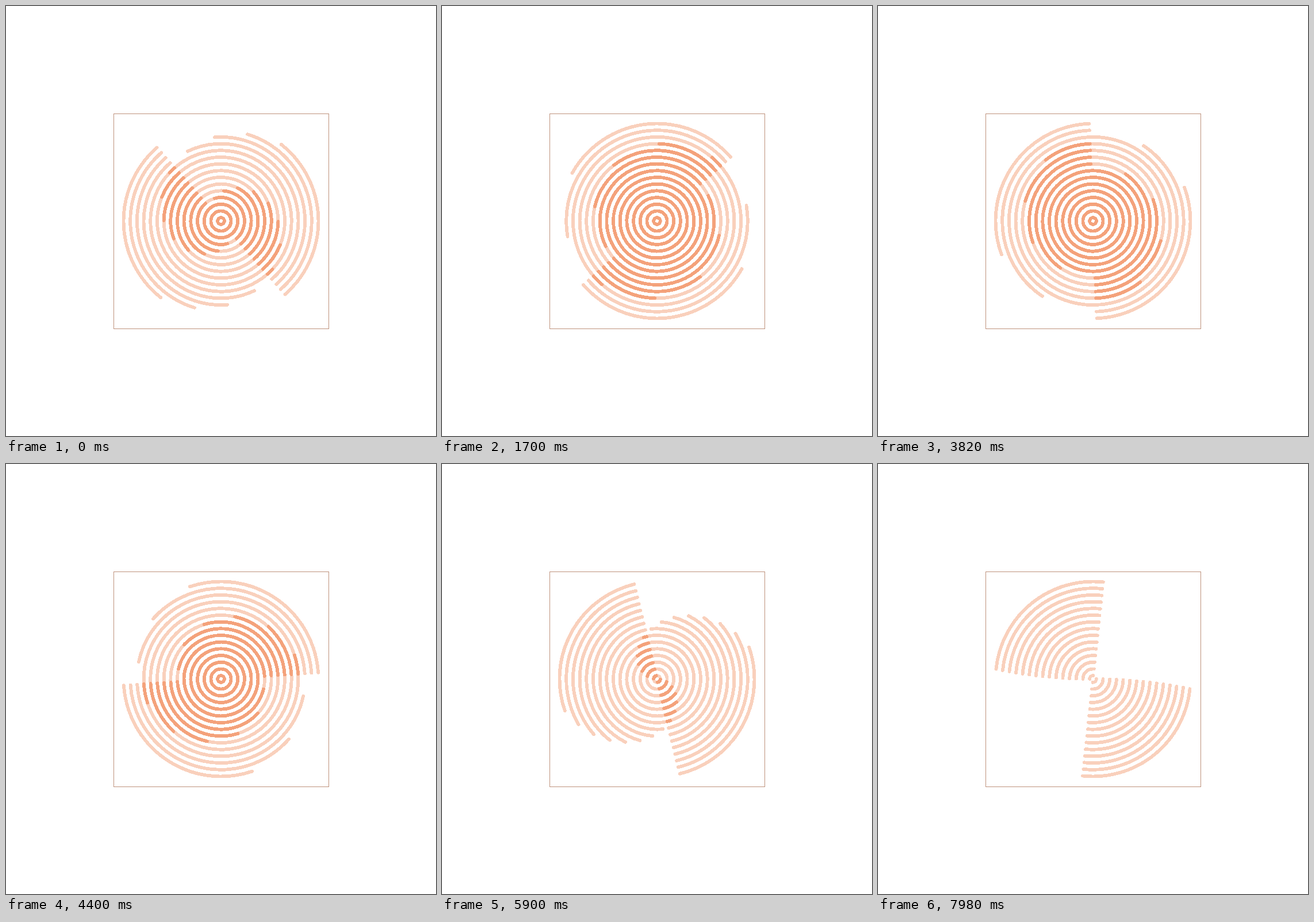
An HTML page for the animation above (8 s loop, 748 by 748 pixels).

```html
<!DOCTYPE html>
<html lang="en">
<head>
<meta charset="utf-8">
<title>Winding rings</title>
<style>
  html, body { margin: 0; width: 100%; height: 100%; overflow: hidden; background: #fff; }
  svg { display: block; width: 100vw; height: 100vh; }
  circle { fill: none; stroke-linecap: round; }
</style>
</head>
<body>
<svg viewBox="0 0 748 748" shape-rendering="crispEdges">
  <rect x="187.5" y="187.5" width="374" height="374" fill="none" stroke="#bf917c"/>
  <g id="rings" transform="translate(374 374)"></g>
</svg>
<script>
const LOOP = 8000, STEP = 20, CYCLE = 10240;
const RINGS = 15, GAP = 374 / 32;
const LIGHT = '#f9d0bc', DARK = '#f4a27b';
const group = document.getElementById('rings');

function addArc(r, color) {
  const c = document.createElementNS('http://www.w3.org/2000/svg', 'circle');
  c.setAttribute('r', r);
  c.setAttribute('pathLength', 360);
  c.setAttribute('stroke', color);
  c.setAttribute('stroke-width', GAP / 2);
  group.appendChild(c);
  return c;
}

function setArc(c, start, length) {
  c.setAttribute('visibility', length > 0 ? 'visible' : 'hidden');
  c.setAttribute('stroke-dasharray', `${Math.max(length, 0)} 720`);
  c.setAttribute('transform', `rotate(${start % 360})`);
}

const rings = Array.from({ length: RINGS }, (_, i) => {
  const pos = i + 0.5, r = pos * GAP;
  const pair = color => [addArc(r, color), addArc(r, color)];
  return { pos, light: pair(LIGHT), dark: pair(DARK) };
});

// All heads share one angle; each tail winds in proportion to its radius.
function draw(t) {
  const wind = 315 * (1 + Math.sin(2 * Math.PI * (t + STEP) / CYCLE));
  for (const { pos, light, dark } of rings) {
    const start = wind * pos / RINGS;
    const length = Math.min(90 + wind - start, 360);
    light.forEach((c, k) => setArc(c, start + 180 * k, length));
    // The two arcs overlap where they reach past a half turn.
    dark.forEach((c, k) => setArc(c, start + 180 * (k + 1), length - 180));
  }
}

const origin = performance.now();
function tick() {
  const t = (performance.now() - origin) % LOOP;
  draw(Math.floor(t / STEP) * STEP);
  requestAnimationFrame(tick);
}
draw(0);
requestAnimationFrame(tick);
</script>
</body>
</html>
```
